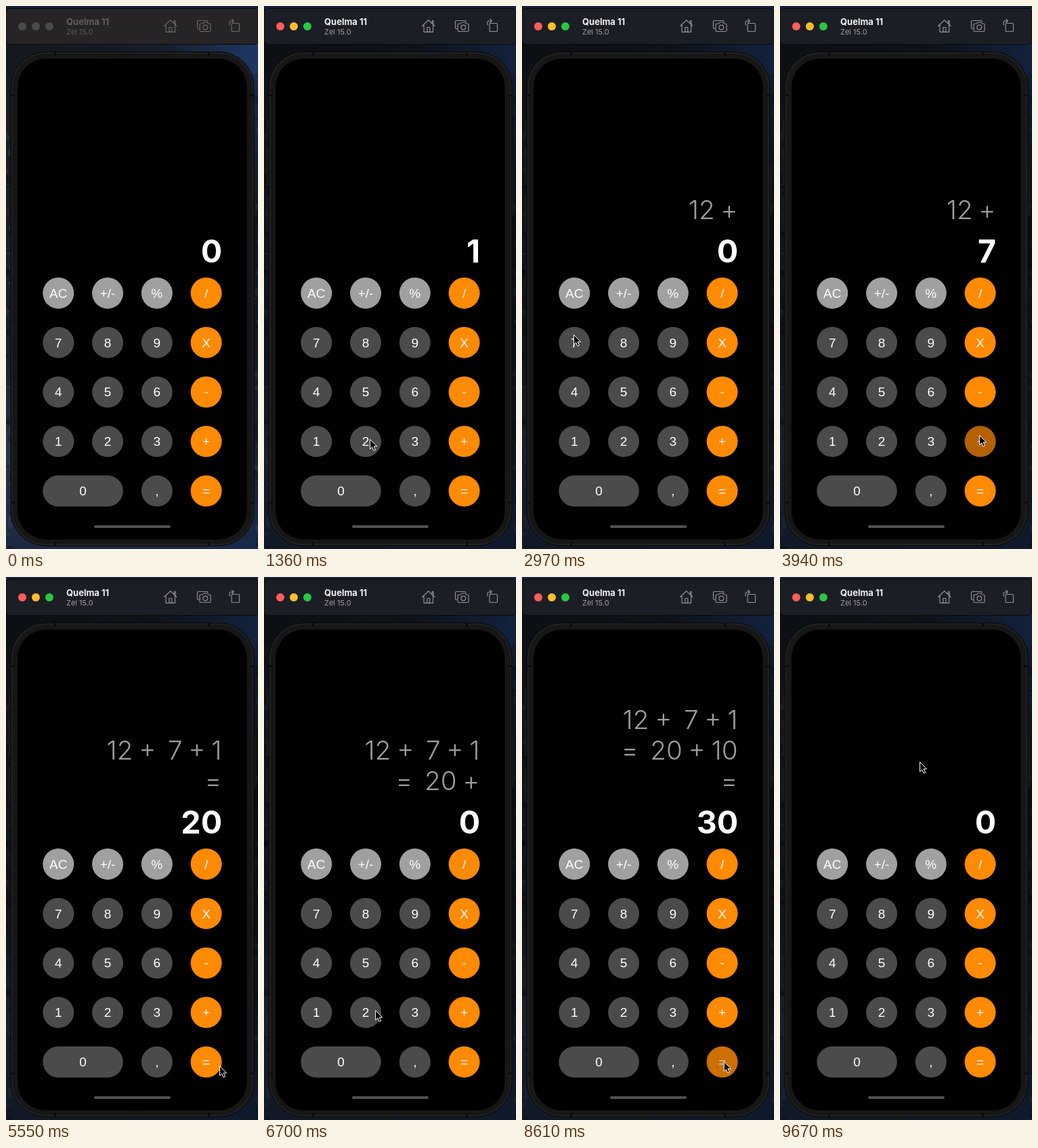
Write an HTML page that moves like this. It is 372 px wide and 800 px high and loops after 9.7 s.

```html
<!DOCTYPE html>
<html lang="en">
<head>
<meta charset="utf-8">
<title>Calculator</title>
<style>
  html, body { margin: 0; width: 100%; height: 100%; overflow: hidden; background: #0b0f17; }
  svg { display: block; width: 372px; height: 800px; }
  text { white-space: pre; }
  .bar { fill: #262427; }
  .title { font: 700 13px Inter, sans-serif; fill: #5f5d60; }
  .sub { font: 400 11px Inter, sans-serif; fill: #5a585b; }
  .dot { fill: #4b494c; }
  .icons { fill: none; stroke: #69676a; stroke-width: 1.2; stroke-linejoin: round; stroke-linecap: round; }
  .shade { opacity: 0; }
  .active .bar { fill: #1c1e25; }
  .active .title { fill: #f1f1f2; }
  .active .sub { fill: #9b9da1; }
  .active .icons { stroke: #8e9095; }
  .active .shade { opacity: .38; }
  .active .red { fill: #ff5f57; }
  .active .yellow { fill: #febc2e; }
  .active .green { fill: #28c840; }
  .key text { font: 400 19px "Liberation Sans", Arial, sans-serif; fill: #fff; text-anchor: middle; }
  .value { font: 700 46.5px Inter, sans-serif; fill: #fff; text-anchor: end; }
  .history text { font: 300 38.5px Inter, sans-serif; fill: #9c9c9c; text-anchor: end; word-spacing: -2px; }
</style>
</head>
<body>
<svg id="stage" viewBox="0 0 372 800">
  <defs>
    <linearGradient id="left" x2="0" y2="1">
      <stop offset="0" stop-color="#14181f"/>
      <stop offset=".3" stop-color="#1a1f29"/>
      <stop offset=".65" stop-color="#18202d"/>
      <stop offset=".8" stop-color="#27344a"/>
      <stop offset="1" stop-color="#1b2840"/>
    </linearGradient>
    <linearGradient id="right" x2="0" y2="1">
      <stop offset="0" stop-color="#1d3763"/>
      <stop offset=".2" stop-color="#172743"/>
      <stop offset=".4" stop-color="#10151e"/>
      <stop offset=".75" stop-color="#151c2a"/>
      <stop offset="1" stop-color="#182a4a"/>
    </linearGradient>
    <linearGradient id="sky">
      <stop offset="0" stop-color="#14181f"/>
      <stop offset=".6" stop-color="#161d2a"/>
      <stop offset="1" stop-color="#1d3763"/>
    </linearGradient>
  </defs>

  <rect width="186" height="800" fill="url(#left)"/>
  <rect x="186" width="186" height="800" fill="url(#right)"/>
  <rect y="50" width="372" height="50" fill="url(#sky)"/>
  <g id="rocks"></g>
  <rect class="shade" y="50" width="372" height="750"/>
  <rect width="372" height="4" fill="#12203a"/>

  <rect class="bar" y="3.5" width="372" height="53" rx="6" stroke="#08090c"/>
  <circle class="dot red" cx="24" cy="30" r="6"/>
  <circle class="dot yellow" cx="44" cy="30" r="6"/>
  <circle class="dot green" cx="64" cy="30" r="6"/>
  <text class="title" x="89" y="28">Quelma 11</text>
  <text class="sub" x="89" y="42">Zel 15.0</text>
  <g class="icons">
    <path d="M233.5 29.5L242.7 20.8L252 29.5M236 28V38.3H249.5V28M248.3 25.5V21.5H250V27.5M240.8 38V31.5H244.8V38Z"/>
    <path d="M285 33.5H283.7Q282.5 33.5 282.5 32V23Q282.5 21.5 284 21.5H296.5Q298 21.5 298 23"/>
    <path d="M287.5 26H290.5L292 24H297L298.5 26H300.5Q302 26 302 27.5V36Q302 37.5 300.5 37.5H287.5Q286 37.5 286 36V27.5Q286 26 287.5 26Z"/>
    <circle cx="294.3" cy="31.5" r="3.4"/>
    <rect x="333" y="25.5" width="11.5" height="12" rx="1.3"/>
    <path d="M330 28V24.5Q330 22 332.5 22H336M333.7 19.5L336.3 22L333.7 24.5"/>
  </g>

  <g fill="#1a1a1b">
    <rect x="4" y="166" width="5" height="27" rx="1.5"/>
    <rect x="4" y="220" width="5" height="45" rx="1.5"/>
    <rect x="4" y="280" width="5" height="45" rx="1.5"/>
    <rect x="364" y="232" width="4.5" height="78" rx="1.5"/>
  </g>
  <rect x="7" y="67.5" width="359" height="728" rx="52" fill="#161617" stroke="#0a0a0b"/>
  <rect x="9" y="69.5" width="355" height="724" rx="50" fill="none" stroke="#242425" stroke-width="1.4"/>
  <path d="M8 131.5H13M360 131.5H365M8 731.5H13M360 731.5H365M72.500 68V73M299.500 68V73M72.500 790V795M299.500 790V795" stroke="#0b0b0c" stroke-width="3"/>
  <rect x="17" y="77.500" width="338.500" height="708.500" rx="42"/>

  <g class="history">
    <text x="318.500" y="223.500"></text>
    <text x="318.500" y="268.500"></text>
    <text x="318.500" y="313.500"></text>
  </g>
  <text class="value" x="319" y="378"></text>
  <g id="keys"></g>
  <rect x="130" y="765" width="113" height="4" rx="2" fill="#505050"/>
  <path id="cursor" d="M.5 .5V14.800L3.700 11.800L6 17L8.500 16L6.200 10.800H10.600Z" fill="#000" stroke="#fff" stroke-linejoin="round"/>
</svg>
<script>
const LOOP = 9700, ACTIVATE = 600;
const HOLD = 100, FADE_IN = 40, FADE_OUT = 200;
const $ = s => document.querySelector(s);

// release time, key id, value and history shown afterwards
const taps = [
  [850, '1', '1', ''],
  [1540, '2', '12', ''],
  [2320, '+', '0', '12 +'],
  [3150, '7', '7', '12 +'],
  [3990, '+', '0', '12 +  7 +'],
  [4700, '1', '1', '12 +  7 +'],
  [5330, '=', '20', '12 +  7 + 1|='],
  [6350, '+', '0', '12 +  7 + 1|=  20 +'],
  [7100, '1', '1', '12 +  7 + 1|=  20 +'],
  [7850, '0', '10', '12 +  7 + 1|=  20 +'],
  [8530, '=', '30', '12 +  7 + 1|=  20 + 10|='],
  [9270, 'AC', '0', '']
];

// pointer stops: arrival, departure, x, y
const stops = [
  [0, 90, 92, 806],
  [480, 950, 79, 643],
  [1300, 1650, 156, 638],
  [2150, 2420, 296, 640],
  [2900, 3250, 76, 484],
  [3800, 4080, 294, 632],
  [4520, 4760, 80, 638],
  [5160, 5380, 302, 714],
  [5520, 5700, 315, 720],
  [6150, 6430, 298, 638],
  [6900, 7180, 80, 638],
  [7600, 7900, 107, 698],
  [8350, 8600, 298, 714],
  [9120, 9310, 80, 422],
  [9650, LOOP, 206, 272]
];

function add(parent, tag, attrs, text = '') {
  const el = document.createElementNS('http://www.w3.org/2000/svg', tag);
  for (const k in attrs) el.setAttribute(k, attrs[k]);
  el.textContent = text;
  parent.append(el);
  return el;
}

function drawRocks() {
  let seed = 11;
  const rnd = () => (seed = seed * 16807 % 2147483647) / 2147483647;
  for (let i = 0; i < 90; i++) {
    const x = i % 3 ? rnd() * 14 - 4 : 364 + rnd() * 8;
    const y = 130 + rnd() * 670, w = 3 + rnd() * 9, h = 3 + rnd() * 12;
    add($('#rocks'), 'path', {
      d: `M${x} ${y}l${w} ${h * .4}l${-w * .4} ${h * .6}l${-w * .8} ${-h * .3}Z`,
      fill: rnd() < .55 ? '#080b11' : '#3a465a',
      opacity: .2 + rnd() * .3
    });
  }
}

const keys = {};
function drawKeys() {
  const rows = [['AC', '+/-', '%', '/'], ['7', '8', '9', 'X'], ['4', '5', '6', '-'],
                ['1', '2', '3', '+'], ['0', '', ',', '=']];
  rows.forEach((row, r) => row.forEach((label, c) => {
    if (!label) return;
    const x = 77.300 + c * 72.750, y = 423 + r * 72.850;
    const wide = label === '0' ? 72.500 : 0;
    const fill = c === 3 ? '#ff8a03' : r ? '#4b4b4b' : '#a0a0a0';
    const g = keys[label] = add($('#keys'), 'g', { class: 'key' });
    add(g, 'rect', { x: x - 23, y: y - 23, width: 46 + wide, height: 46, rx: 23, fill });
    add(g, 'text', { x: x + wide / 2, y: y + 6.700 }, label);
  }));
}

const clamp = v => Math.max(0, Math.min(1, v));
const ease = v => v * v * (3 - 2 * v);

function pointer(t) {
  const i = Math.max(0, stops.findLastIndex(s => s[0] <= t));
  const a = stops[i], b = stops[i + 1] || a;
  const k = b === a ? 0 : ease(clamp((t - a[1]) / (b[0] - a[1])));
  return [a[2] + (b[2] - a[2]) * k, a[3] + (b[3] - a[3]) * k];
}

const lines = [...document.querySelectorAll('.history text')];
let shown = '';
function show(value, history) {
  if (shown === value + history) return;
  shown = value + history;
  $('.value').textContent = value;
  const rows = history.split('|');
  lines.forEach((el, i) => el.textContent = rows[i - 3 + rows.length] || '');
}

function render(t) {
  $('#stage').classList.toggle('active', t >= ACTIVATE);
  const done = taps.findLast(p => p[0] <= t);
  show(done ? done[2] : '0', done ? done[3] : '');

  const dim = {};
  for (const [end, key] of taps) {
    const k = t < end ? clamp((t - end + HOLD) / FADE_IN) : 1 - ease(clamp((t - end) / FADE_OUT));
    dim[key] = Math.max(dim[key] || 0, k);
  }
  for (const key in dim) keys[key].setAttribute('opacity', 1 - .3 * dim[key]);

  const [x, y] = pointer(t);
  $('#cursor').setAttribute('transform', `translate(${x} ${y})`);
}

drawRocks();
drawKeys();
const start = performance.now();
function tick() {
  render((performance.now() - start) % LOOP);
  requestAnimationFrame(tick);
}
tick();
</script>
</body>
</html>
```
